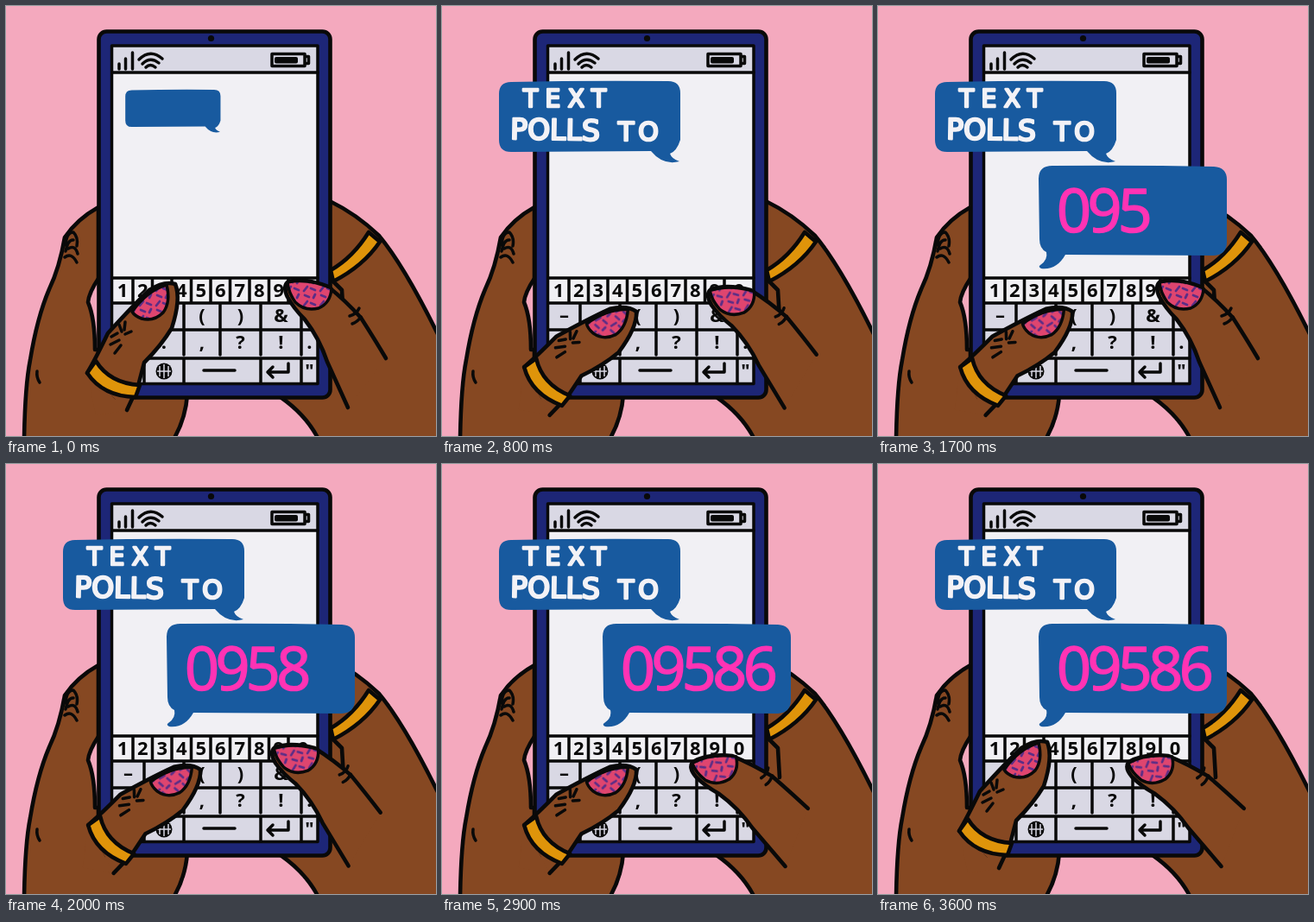
Animation of 498x498 px, one loop 3700 ms. Source, as an HTML page:

```html
<!DOCTYPE html>
<html lang="en">
<head>
<meta charset="utf-8">
<title>Text message</title>
<style>
  html, body { margin: 0; width: 100%; height: 100%; overflow: hidden; background: #f4a9be; }
  svg { display: block; width: 100vw; height: 100vh; }
  .ink { fill: none; stroke: #090909; stroke-width: 4.6; stroke-linecap: round; stroke-linejoin: round; }
  .thin { stroke-width: 3.5; }
  .skin { fill: #864822; }
  .gold { fill: #df940a; }
  .pink { fill: #f4a9be; }
  .nail { fill: url(#sprinkles); }
  .bubble { fill: #185a9f; }
  .keys text { font: 700 22px "Open Sans", "Noto Sans", sans-serif; text-anchor: middle; fill: #090909; }
  .word { font-family: "DejaVu Sans", sans-serif; fill: #f3f2f6; stroke: #f3f2f6; stroke-width: 2.6; stroke-linejoin: round; }
  .code { font: 70px "Open Sans", "Noto Sans", sans-serif; letter-spacing: -4.6px; fill: #ff33b4; stroke: #ff33b4; stroke-width: 1.6; stroke-linejoin: round; }
</style>
</head>
<body>
<svg viewBox="0 0 498 498">
  <pattern id="sprinkles" width="19" height="17" patternUnits="userSpaceOnUse">
    <rect width="19" height="17" fill="#df456f"/>
    <path d="M3 7L7 2M11 4L16 6M4 12L9 14M14 15L16 11" stroke="#5b2d86" stroke-width="2.8" stroke-linecap="round"/>
  </pattern>
  <rect class="pink" width="498" height="498"/>

  <!-- hands behind the phone -->
  <path class="ink skin" d="M107 233Q82 247 68 268Q62 303 50 328Q36 361 28 410Q22 440 21 502H194Q208 478 210 450L107 440Z"/>
  <path class="ink pink" d="M108 314Q96 332 95 343Q103 362 103 398H108"/>
  <path class="ink thin" d="M69 277Q70 262 78 262Q84 268 82 278M69 284Q72 270 78 271M68 291Q76 285 82 297M72 281Q80 276 83 287M36 423Q35 430 39 436"/>
  <path class="ink skin" d="M375 226Q406 241 432 266Q462 302 502 384V502H362Q348 474 318 453L370 440Z"/>
  <path class="ink gold" d="M420 262Q402 291 376 306L379 319Q414 301 433 273Z"/>
  <path class="ink" d="M379 319L389 329L391 363"/>

  <!-- phone -->
  <rect class="ink" x="107.5" y="29.5" width="268" height="424" rx="9" style="fill:#1d2677"/>
  <rect x="122" y="46" width="239" height="392" fill="#f1f0f4"/>
  <path fill="#d9d8e4" d="M122 46H361V77H122ZM122 344H361V438H122Z"/>
  <circle cx="237.500" cy="37.500" r="3.600" fill="#090909"/>
  <path class="ink thin" d="M123 77H361M131 67V73M138.500 61V73M146.500 54V73M154 62Q167 49 181 61M158 67Q167 58 177 66M162 71Q167 66 173 71"/>
  <path class="ink thin" d="M308 55.500H346V69.500H308ZM347 58.500H350.500V66.500H347"/>
  <rect x="311" y="59" width="27" height="7.500" rx="2" fill="#090909"/>
  <g class="keys">
    <path class="ink thin" id="grid"/>
    <g id="caps"></g>
    <path class="ink thin" d="M229 422H265M327 414V424H304M309 418L303 424L309 430"/>
    <circle cx="183" cy="423" r="9.500" fill="#090909"/>
    <path d="M178 417V429M188 417V429M175 423H191M183 415V431" stroke="#d9d8e4" stroke-width="1.500"/>
  </g>
  <rect class="ink thin" x="122.500" y="46" width="238.500" height="391.500"/>

  <!-- thumbs -->
  <g id="left">
    <path class="skin" d="M94 425L140 468L104 474Z"/>
    <path class="ink skin" d="M94 425Q103 410 118 379Q147 347 166 329Q183 318 196 322Q203 339 192 373Q180 393 160 413L153 440L140 468"/>
    <path class="ink gold" d="M104 411Q120 437 155 439L150 453Q112 452 94 425Z"/>
    <path class="ink thin nail" d="M146 354Q164 329 186 323Q191 343 182 355Q171 366 157 362Q149 359 146 354Z"/>
    <path class="ink thin" d="M122 383L129 379M121 392L131 387M126 402L133 393M131 369L134 377M138 366L137 375M138 380L145 377"/>
  </g>
  <g id="right">
    <path class="ink skin" d="M440 408Q427 386 411 361Q393 341 373 325Q346 314 327 319Q320 324 326 337Q333 350 346 363Q363 385 372 412L396 465"/>
    <path class="ink thin nail" d="M326 320Q350 315 377 327Q376 344 362 350Q346 354 335 343Q327 332 326 320Z"/>
    <path class="ink thin" d="M398 359Q406 357 409 350M401 368Q407 366 411 360"/>
  </g>

  <!-- messages -->
  <g id="ask">
    <path class="bubble" d="M80 88Q170 86 262 87Q276 87 276 101V155Q272 168 264 171Q266 177 275 180Q256 185 242 168L80 169Q66 169 66 155L66 102Q66 88 80 88Z"/>
    <text class="word" x="94" y="117" font-size="28" letter-spacing="8.500">TEXT</text>
    <text class="word" x="79" y="154" font-size="33" transform="rotate(1 79 154)">POLLS</text>
    <text class="word" x="204" y="156" font-size="30" letter-spacing="5">TO</text>
  </g>
  <g id="reply">
    <path class="bubble" d="M202 185Q300 184 389 186Q404 187 404 201V273Q404 288 389 289L217 288Q207 306 189 304Q185 302 188 300Q197 294 195 285Q187 281 187 270L186 200Q186 185 202 185Z"/>
    <text class="code" id="code" x="207" y="262"></text>
  </g>
</svg>
<script>
const LOOP = 3700;
const CODE = "09586";
const $ = id => document.getElementById(id);

// Keyboard: a cap sits in the middle of each cell between two dividers
const digitCols = Array.from({ length: 9 }, (_, i) => 147 + 22.5 * i);
const signCols = [160, 206, 248, 295, 342];
const rows = [
  [315, digitCols, "1234567890"],
  [344, signCols, "– ()& "],
  [375, signCols, " .,?!."],
  [408, signCols.filter(x => x !== 248), '    "']
];
let grid = "", caps = "";
for (const [top, cols, chars] of rows) {
  const edges = [123, ...cols, 361];
  grid += `M123 ${top}H361` + cols.map(x => `M${x} ${top}v29`).join("");
  [...chars].forEach((c, i) => {
    const mid = (edges[i] + edges[i + 1]) / 2;
    caps += `<text x="${mid}" y="${top + 22}">${c === "&" ? "&amp;" : c}</text>`;
  });
}
$("grid").setAttribute("d", grid);
$("caps").innerHTML = caps;

// Thumbs: one letter per hold, each letter a turn in degrees
const HOLD = 400;
const thumbs = [
  { id: "left", pivot: "115 425", taps: "ACBBBBCBCA", turn: { A: 0, B: 19, C: 6.5 } },
  { id: "right", pivot: "400 460", taps: "ABBBABCCCC", turn: { A: 0, B: -6.7, C: -16.3 } }
];
const words = document.querySelectorAll(".word");

// Pops from about half size to full in two steps
function pop(id, age, x, y) {
  const k = age < 0 ? 0 : 0.525 + 0.475 * Math.min(1, Math.floor(age / 100) / 2);
  $(id).setAttribute("transform", `translate(${x * (1 - k)} ${y * (1 - k)}) scale(${k})`);
}

// One digit per 200 ms, then a 400 ms blink
function typed(t) {
  if (t < 2300) return CODE.slice(0, Math.max(0, Math.floor((t - 1100) / 200)));
  return Math.floor((t - 2300) / 400) % 2 ? CODE : "";
}

function draw() {
  const t = performance.now() % LOOP;
  for (const { id, pivot, taps, turn } of thumbs) {
    const deg = turn[taps[Math.floor(t / HOLD)]];
    $(id).setAttribute("transform", `rotate(${deg} ${pivot})`);
  }
  pop("ask", t, 218, 108);
  pop("reply", t - 1000, 270, 220);
  words.forEach((w, i) => w.setAttribute("visibility", t >= 300 + 200 * i ? "visible" : "hidden"));
  $("code").textContent = typed(t);
  requestAnimationFrame(draw);
}
draw();
</script>
</body>
</html>
```
